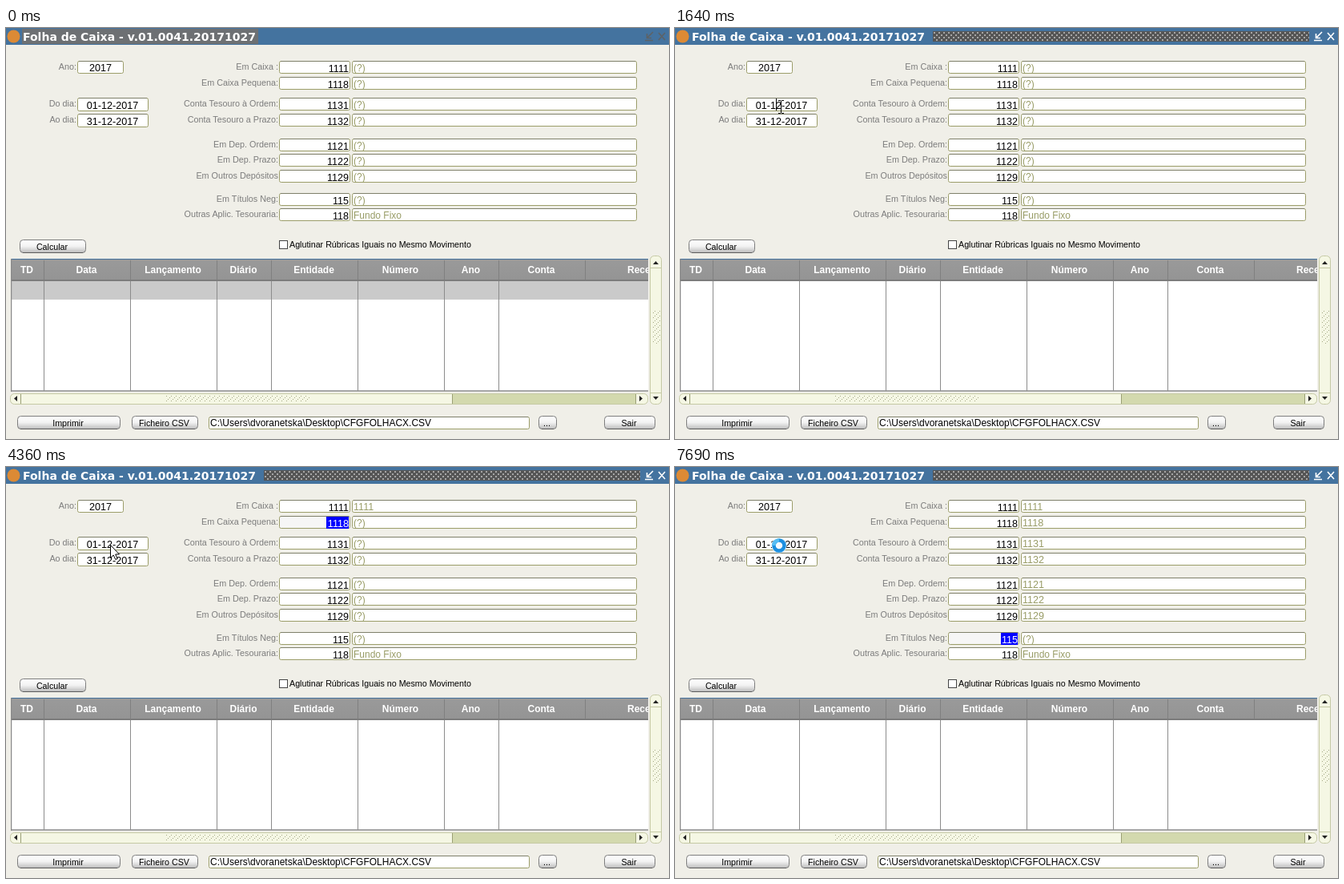
Write an HTML page that moves like this. It is 828 px wide and 513 px high and loops after 8 s.

```html
<!DOCTYPE html>
<html lang="pt">
<head>
<meta charset="utf-8">
<title>Folha de Caixa</title>
<style>
  html, body { margin: 0; width: 100%; height: 100%; overflow: hidden; background: #f0efe8; }
  svg { display: block; width: 828px; height: 513px; }
  text { font-family: "Liberation Sans", Arial, sans-serif; font-size: 12px; white-space: pre; }
  .title { font: bold 14px "DejaVu Sans", sans-serif; fill: #fff; }
  .label { font-size: 10.8px; fill: #7c7c7c; }
  .small { font-size: 10.7px; fill: #000; }
  .num { font-size: 12.6px; fill: #000; }
  .desc { fill: #989c66; }
  .descnum { font-size: 12.6px; fill: #989c66; }
  .head { font-weight: bold; fill: #fff; }
  .off { visibility: hidden; }
</style>
</head>
<body>
<svg id="stage" viewBox="0 0 828 513">
  <defs>
    <linearGradient id="btn" x2="0" y2="1">
      <stop offset="0" stop-color="#fff"/><stop offset=".5" stop-color="#f2f2f2"/><stop offset="1" stop-color="#bcbcbc"/>
    </linearGradient>
    <linearGradient id="headFill" x2="0" y2="1">
      <stop offset="0" stop-color="#9a9a9a"/><stop offset="1" stop-color="#949494"/>
    </linearGradient>
    <pattern id="mesh" width="6" height="6" x="322" y="4" patternUnits="userSpaceOnUse">
      <rect width="6" height="6" fill="#555"/>
      <path d="M1 1h2v2h-2zM4 4h2v2h-2z" fill="#a6a6a6"/>
    </pattern>
    <pattern id="grip" width="6" height="6" patternUnits="userSpaceOnUse">
      <path d="M0 5h1v1h-1zM2 3h1v1h-1zM4 1h1v1h-1z" fill="#a4a884"/>
    </pattern>
    <clipPath id="tableClip"><rect x="6" y="288" width="796" height="166"/></clipPath>
  </defs>
</svg>
<script>
const LOOP = 8000;
const stage = document.getElementById('stage');
const out = [];
const add = s => out.push(s);

const rect = (x, y, w, h, fill, extra = '') =>
  `<rect x="${x}" y="${y}" width="${w}" height="${h}" fill="${fill}" ${extra}/>`;
const text = (x, y, str, cls, anchor = 'start', extra = '') =>
  `<text x="${x}" y="${y}" class="${cls}" text-anchor="${anchor}" ${extra}>${str}</text>`;
const path = (d, stroke, fill = 'none', extra = '') =>
  `<path d="${d}" stroke="${stroke}" fill="${fill}" ${extra}/>`;
const field = (x, y, w, id = '', h = 16) =>
  rect(x + .5, y + .5, w - 1, h - 1, '#fff', `rx="2" stroke="#9b9d69" ${id && `id="${id}"`}`) +
  path(`M${x + 2} ${y + .5}h${w - 4}`, '#7f806a');
const button = (x, y, w, label) =>
  rect(x + .5, y + .5, w - 1, 16, 'url(#btn)', 'rx="4" stroke="#7e7e7e"') +
  path(`M${x + 4} ${y + 16.5}h${w - 8}`, '#5c5c5c') +
  text(x + w / 2 - 1, y + 13, label, 'small', 'middle');

// Title bar
add(rect(0, 0, 828, 21, '#44739f'));
add(rect(20, 1, 295, 19, '#6d7073', 'id="titleDim"'));
add(rect(322, 4, 470, 13, 'url(#mesh)', 'id="titleMesh"'));
add('<circle cx="9.5" cy="10.5" r="8" fill="#dc8a35"/>');
add(text(21, 16, 'Folha de Caixa - v.01.0041.20171027', 'title'));
add('<g id="winIcons" stroke-width="1.6" fill="none">' +
  '<path d="M808 5l-7 7M800.500 7v5.500h5.500M798 15.500h10M815 6l8 9M823 6l-8 9"/></g>');

// Period fields
add(text(88, 52, 'Ano:', 'label', 'end') + field(89, 41, 58) + text(118, 54, '2017', 'num', 'middle'));
[['Do dia:', 87, '01-12-2017', 'from'], ['Ao dia:', 107, '31-12-2017', 'to']].forEach(([label, y, value, id]) => {
  add(text(88, y + 11, label, 'label', 'end') + field(89, y, 89, id, 17));
  add(rect(101, y + 2, 65, 14, '#00f', `id="${id}Sel" class="off"`));
  add(text(133, y + 14, value, 'num', 'middle', `id="${id}Text"`));
});
add(rect(87.5, 85.5, 92, 20, 'none', 'id="ring" class="off" rx="2" stroke="#b9b9a6"'));
add(rect(126, 88, 1, 15, '#000', 'id="caret" class="off"'));

// Account rows: label, top, code
const rows = [
  ['Em Caixa :', 41, '1111'], ['Em Caixa Pequena:', 61, '1118'],
  ['Conta Tesouro à Ordem:', 87, '1131'], ['Conta Tesouro a Prazo:', 107, '1132'],
  ['Em Dep. Ordem:', 138, '1121'], ['Em Dep. Prazo:', 157, '1122'],
  ['Em Outros Depósitos', 177, '1129'], ['Em Títulos Neg:', 206, '115'],
  ['Outras Aplic. Tesouraria:', 225, '118']
];
rows.forEach(([label, y, code], i) => {
  const w = code.length * 7;
  add(text(340, y + 11, label, 'label', 'end'));
  add(field(341, y, 89, 'box' + i) + field(432, y, 356));
  add(rect(428 - w, y + 1, w, 15, '#00f', `id="sel${i}" class="off"`));
  add(text(428, y + 13.5, code, 'num', 'end', `id="code${i}"`));
  add(text(434, y + 13, i === 8 ? 'Fundo Fixo' : '(?)', 'desc', 'start', `id="desc${i}"`));
});

add(button(17, 264, 83, 'Calcular'));
add(rect(341.5, 265.5, 10, 10, '#fff', 'stroke="#444"'));
add(text(354, 274, 'Aglutinar Rúbricas Iguais no Mesmo Movimento', 'small'));

// Table
const edges = [6, 47, 155, 263, 331, 439, 547, 615, 723];
const heads = ['TD', 'Data', 'Lançamento', 'Diário', 'Entidade', 'Número', 'Ano', 'Conta'];
add('<g clip-path="url(#tableClip)">' + rect(6, 288, 796, 166, '#fff') +
  rect(6, 288, 796, 27, 'url(#headFill)') +
  rect(6, 316, 796, 23, '#cacaca', 'id="activeRow"') +
  path('M6 315h796', '#7c7c7c', 'none', 'stroke-width="2"') +
  path('M6 288.500h796', '#44739f') +
  path('M6.500 288v166M6 453h796', '#8a8a8a', 'none', 'stroke-width="1.500"'));
edges.slice(1).forEach((x, i) => {
  add(path(`M${x + .5} 290v24`, '#808080'));
  if (i < 7) add(path(`M${x + .5} 316v137`, '#8c8c8c'));
  add(text((edges[i] + x) / 2 - .5, 306, heads[i], 'head', 'middle'));
});
add(text(776, 306, 'Receita', 'head') + '</g>');

// Scrollbars
add(rect(5.5, 456.500, 796, 13, '#f5f7e4', 'rx="5" stroke="#c5c9a4"'));
add(rect(557, 457, 230, 12, '#d3d9ae') + path('M18.500 457v12M557.500 457v12M786.500 457v12', '#9a9f76'));
add(rect(200, 459, 180, 8, 'url(#grip)'));
add(path('M14 459v7l-4-3.500zM791 459v7l4-3.500z', 'none', '#222'));
add(rect(804.500, 284.500, 14, 185, '#f5f7e4', 'rx="5" stroke="#c5c9a4"'));
add(path('M805 299.500h13M805 455.500h13', '#c5c9a4') + rect(808, 352, 9, 43, 'url(#grip)'));
add(path('M808 295h7l-3.500-4zM808 460h7l-3.500 4z', 'none', '#222'));

// Footer
add(button(14, 484, 129, 'Imprimir') + button(157, 484, 83, 'Ficheiro CSV'));
add(field(253, 485, 401) + text(255, 497, 'C:\\Users\\dvoranetska\\Desktop\\CFGFOLHACX.CSV', ''));
add(button(665, 484, 23, '...') + button(747, 484, 64, 'Sair'));

// Pointers
add('<path id="arrow" class="off" d="M.5.5V16.500L4.200 13L6.800 18.500L9.200 17.500L6.700 12H11.500Z" fill="#fff" stroke="#000"/>');
add('<path id="beam" class="off" d="M0 .5H3M4 .5H7M3.500 1V16M0 16.500H3M4 16.500H7" fill="none" stroke="#000"/>');
add('<g id="busy" class="off"><circle r="9.500" fill="#d9effb"/><circle r="6.500" fill="#f4faff" stroke="#1c8fe0" stroke-width="4.500"/>' +
  '<path d="M-6.500 0A6.500 6.500 0 0 1 0-6.500" fill="none" stroke="#55bdf3" stroke-width="4.500"/></g>');

stage.insertAdjacentHTML('beforeend', out.join(''));

const el = {};
stage.querySelectorAll('[id]').forEach(n => el[n.id] = n);
const show = (id, on) => { el[id].style.visibility = on ? 'visible' : 'hidden'; };
const between = (t, a, b) => t >= a && t < b;

// Pointer: time, shape, x, y
const pointer = [
  [0, ''], [230, 'arrow', 542, 334], [310, 'arrow', 392, 244], [390, 'arrow', 276, 179],
  [620, 'arrow', 264, 166], [700, 'arrow', 229, 136], [780, 'arrow', 186, 103],
  [860, 'arrow', 150, 80], [930, 'arrow', 133, 73], [1010, 'beam', 129, 87], [1090, 'beam', 129, 90],
  [1960, 'beam', 129, 91], [2880, 'arrow', 130, 97], [4200, 'busy', 130, 98],
  [4360, 'arrow', 130, 97], [5460, 'busy', 130, 98], [6300, 'arrow', 130, 97], [7690, 'busy', 130, 98]
];
// Moments at which the focus enters each account row
const focusAt = [3590, 4280, 4670, 4900, 5210, 6300, 6380, 7080];

function draw(t) {
  const active = t >= 1640;
  show('titleDim', !active);
  show('titleMesh', active);
  show('activeRow', !active);
  el.winIcons.setAttribute('stroke', active ? '#fff' : '#5d6266');

  show('ring', between(t, 1010, 1640) || between(t, 2100, 3020));
  show('caret', between(t, 1550, 2730));
  const second = between(t, 3020, 3590);
  show('toSel', second);
  el.toText.style.fill = second ? '#fff' : '#000';

  const focus = focusAt.filter(a => t >= a).length - 1;
  rows.forEach(([, , code], i) => {
    const on = i === focus;
    show('sel' + i, on);
    el['code' + i].style.fill = on ? '#fff' : '#000';
    el['box' + i].setAttribute('fill', on ? '#f6f6f6' : '#fff');
    if (i === 8) return;
    const done = i < focus;
    el['desc' + i].textContent = done ? code : '(?)';
    el['desc' + i].setAttribute('class', done ? 'descnum' : 'desc');
  });

  const [, shape, x, y] = pointer.filter(p => t >= p[0]).pop();
  ['arrow', 'beam', 'busy'].forEach(id => show(id, id === shape));
  if (shape) el[shape].setAttribute('transform', `translate(${x} ${y})`);
}

const start = performance.now();
function tick() {
  draw((performance.now() - start) % LOOP);
  requestAnimationFrame(tick);
}
tick();
</script>
</body>
</html>
```
